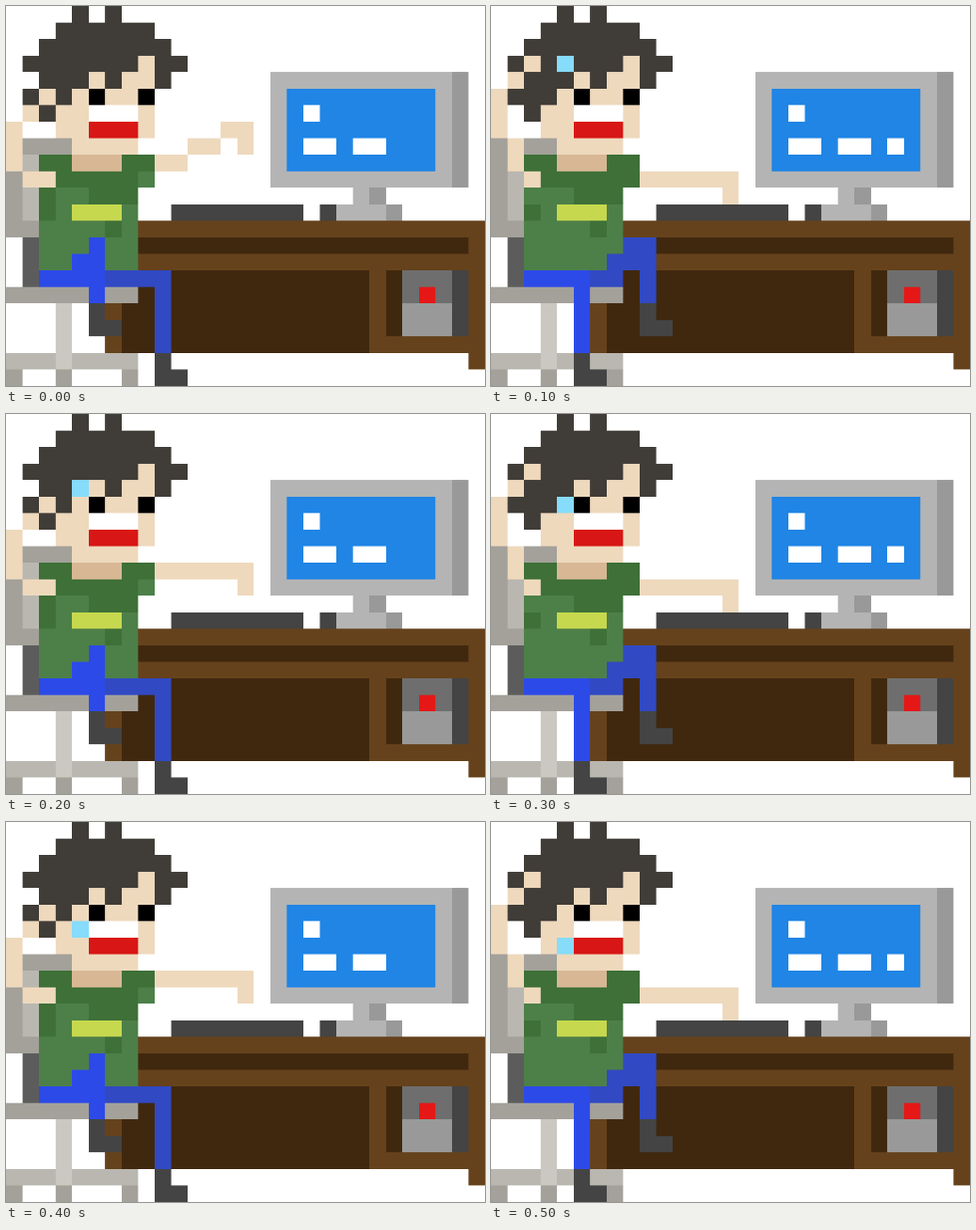
Recreate the animation shown at these times as an HTML page with a canvas. Size 480 px wide and 381 px high, loop 600 ms.

```html
<!DOCTYPE html>
<html lang="en">
<head>
<meta charset="utf-8">
<title>Typing at the desk</title>
<style>
html, body { margin: 0; width: 100%; height: 100%; overflow: hidden; background: #fff; }
canvas { display: block; width: 480px; height: 381px; }
</style>
</head>
<body>
<canvas id="stage"></canvas>
<script>
const COLS = 29, ROWS = 23, CELL = 33, STEP = 100, STEPS = 6;
const canvas = document.getElementById('stage');
canvas.width = COLS * CELL;
canvas.height = ROWS * CELL;
const ctx = canvas.getContext('2d');
ctx.scale(CELL, CELL); // everything below is measured in grid cells

const C = {
  hair: '#403c37', skin: '#eed9bd', neck: '#d8b894', black: '#000', white: '#fff',
  red: '#d81616', drop: '#86dcfa', shirt: '#4d8048', shade: '#3e7038', lime: '#c6d84e',
  near: '#2c4ae8', far: '#3149c2', dark: '#444', wood: '#66421c', deep: '#40280f',
  metal: '#b4b4b4', side: '#999', box: '#6e6e6e', lamp: '#e51717', screen: '#2085e5',
  chair: '#a3a19a', back: '#b9b7b0', post: '#cbc8c2', rod: '#5c5c5c'
};

function put(color, x, y, w = 1, h = 1) {
  ctx.fillStyle = C[color];
  ctx.fillRect(x, y, w, h);
}

// Fills the cells along straight lines between the given points.
function trail(color, ...points) {
  for (let k = 1; k < points.length; k++) {
    const [x0, y0] = points[k - 1], [x1, y1] = points[k];
    const n = Math.ceil(Math.max(Math.abs(x1 - x0), Math.abs(y1 - y0))) || 1;
    for (let i = 0; i <= n; i++)
      put(color, Math.floor(x0 + (x1 - x0) * i / n), Math.floor(y0 + (y1 - y0) * i / n));
  }
}

function drawDesk() {
  put('wood', 6, 13, 23, 8);
  put('wood', 28, 21);
  put('deep', 8, 14, 20);
  put('deep', 7, 16, 15, 5);
  put('deep', 23, 16, 1, 4);
  put('box', 24, 16, 3, 2);
  put('side', 24, 18, 3, 2);
  put('dark', 27, 16, 1, 4);
  put('lamp', 25, 17);
  put('dark', 10, 12, 8);
}

function drawMonitor(typing) {
  put('metal', 16, 4, 11, 7);
  put('side', 27, 4, 1, 7);
  put('screen', 17, 5, 9, 5);
  put('metal', 21, 11);
  put('side', 22, 11);
  put('dark', 19, 12);
  put('metal', 20, 12, 3);
  put('side', 23, 12);
  put('white', 18, 6);
  for (let word = 0; word < 2; word++) put('white', 18 + 3 * word, 8, 2);
  if (typing) put('white', 24, 8);
}

function drawChair() {
  put('chair', 0, 8, 2, 6);
  put('chair', 2, 8, 2);
  put('back', 1, 9, 1, 4);
  put('rod', 1, 14, 1, 3);
  put('chair', 0, 17, 8);
  put('back', 0, 21, 8);
  put('post', 3, 18, 1, 4);
  for (const x of [0, 3, 7]) put('chair', x, 22);
}

function drawShirt(typing) {
  put('shirt', 2, 11, 6, 5);
  put('shade', 2, 9, 7, 2);
  put('shade', 5, 11, 3);
  put('shade', 6, 13);
  put('shade', 2, 12);
  if (!typing) {
    put('shirt', 8, 10);
    put('shade', 2, 11);
  }
  put('neck', 4, 9, 3);
  put('lime', 4, 12, 3);
}

function drawLeg(color, hip, bend, foot, raised) {
  const heel = raised ? 18 : 21;
  if (raised)
    trail(color, [hip, 16], [bend, 16], [bend, 15], [bend + 1, 15],
      [bend + 1, 14], [foot, 14], [foot, heel - 1]);
  else
    trail(color, [hip, 16], [foot, 16], [foot, heel - 1]);
  trail('dark', [foot, heel], [foot, heel + 1], [foot + 1, heel + 1]);
}

function drawHead() {
  for (const x of [4, 6]) put('hair', x, 0);
  for (let y = 1; y <= 3; y++) put('hair', 4 - y, y, 2 * y + 4);
  put('skin', 8, 3);
  put('skin', 5, 4, 4);
  put('skin', 4, 5, 5);
  put('skin', 3, 6, 6, 2);
  put('skin', 4, 8, 4);
  put('hair', 2, 4, 3);
  for (const x of [6, 9]) put('hair', x, 4);
  put('hair', 1, 5, 3);
  put('hair', 2, 6);
  for (const x of [5, 8]) put('black', x, 5);
  put('white', 5, 6, 3);
  put('red', 5, 7, 3);
}

function drawArms(step, typing) {
  const y = typing ? 0 : 2;
  trail('skin', [2, 3 + y], [0, 5 + y], [0, 7 + y], [1, 8 + y], [2, 10]);
  const shoulder = typing ? 10 : 9, wrist = step ? shoulder : 7;
  trail('skin', [9, shoulder + 0.5], [14, wrist], [14, wrist + 1]);
}

function draw(step) {
  const typing = step % 2 === 1;
  put('white', 0, 0, COLS, ROWS);
  drawDesk();
  drawMonitor(typing);
  drawChair();
  drawShirt(typing);
  drawLeg('near', 2, 4, 5, !typing);
  drawLeg('far', 6, 7, 9, typing);
  drawHead();
  drawArms(step, typing);
  if (step) put('drop', 4, 2 + step);
}

const start = performance.now();
function tick(now) {
  draw(Math.floor(Math.max(0, now - start) / STEP) % STEPS);
  requestAnimationFrame(tick);
}
draw(0);
requestAnimationFrame(tick);
</script>
</body>
</html>
```
